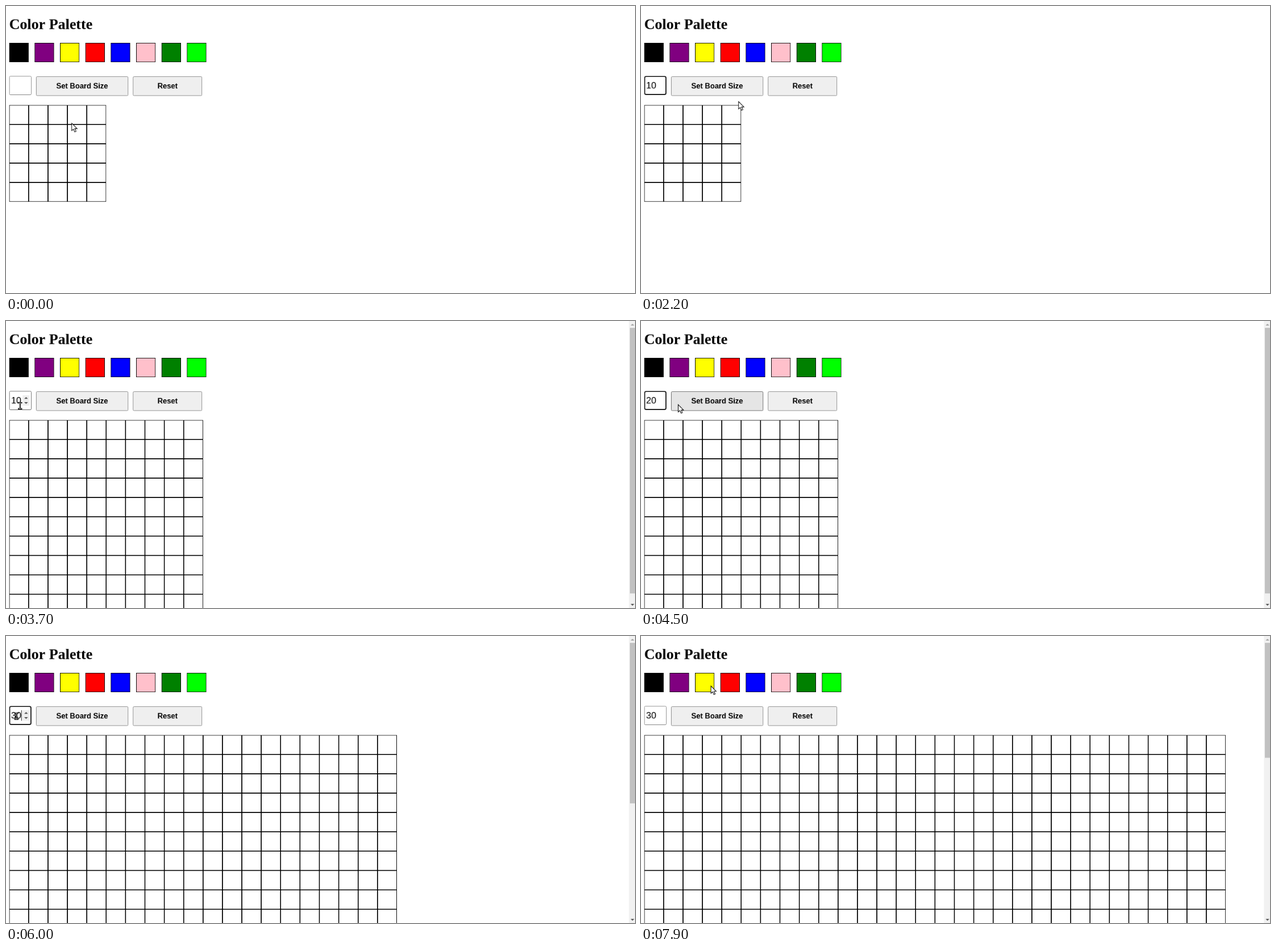
Animation, 1107 px wide and 506 px high, one loop 8 s. Source, as an HTML page with a canvas:

```html
<!DOCTYPE html>
<html lang="en">
<head>
<meta charset="utf-8">
<title>Color Palette</title>
<style>
  html, body { margin: 0; width: 1107px; height: 506px; overflow: hidden; background: #fff; }
  canvas { display: block; }
</style>
</head>
<body>
<canvas id="stage" width="1107" height="506"></canvas>
<script>
const stage = document.getElementById('stage').getContext('2d');
// The page is laid out on whole pixels, then shrunk onto the stage.
const W = 1363, H = 623;
const page = Object.assign(document.createElement('canvas'), { width: W, height: H });
const ctx = page.getContext('2d');

const LOOP = 8000, TICK = 100, LEFT = 7, CELL = 42, BASELINE = 179;
const COLORS = ['black', 'purple', 'yellow', 'red', 'blue', 'pink', 'green', 'lime'];

// Each round: click the field, type a size, press the button.
const ROUNDS = [
  { size: 10, focus: 800, type: 1500, press: 2900 },
  { size: 20, focus: 3800, type: 4100, press: 4700 },
  { size: 30, focus: 5600, type: 5900, press: 6400 }
];
// Pointer moves: start, end, target x, target y
const MOVES = [
  [100, 800, 25, 170], [2100, 2300, 273, 219], [2500, 2900, 153, 165],
  [3000, 3700, 30, 184], [4300, 4700, 97, 180], [4800, 5400, 22, 174],
  [6100, 6400, 114, 178], [7000, 7900, 151, 108]
];

function pointerAt(t) {
  let x = 142, y = 254;
  for (const [start, end, toX, toY] of MOVES) {
    const k = Math.min(1, Math.max(0, (t - start) / (end - start)));
    const eased = k * (2 - k);
    x += (toX - x) * eased;
    y += (toY - y) * eased;
  }
  return [Math.round(x), Math.round(y)];
}

function stateAt(t) {
  const state = { value: '', size: 5, focused: false, pressed: false, clearing: false };
  for (const { size, focus, type, press } of ROUNDS) {
    const typed = Math.floor((t - type) / TICK) + 1;
    if (typed >= 0) state.value = String(size).slice(0, typed);
    if (t >= press + TICK) state.size = size;
    state.focused ||= t >= focus && t < press;
    state.pressed ||= t >= press && t < press + TICK;
    state.clearing ||= typed === 0;
  }
  return state;
}

function rect(x, y, w, h, color) {
  ctx.fillStyle = color;
  ctx.fillRect(x, y, w, h);
}

function roundBox(x, y, w, h, fill, stroke, line = 1) {
  ctx.beginPath();
  ctx.roundRect(x + line / 2, y + line / 2, w - line, h - line, line + 1);
  ctx.fillStyle = fill;
  ctx.fill();
  ctx.lineWidth = line;
  ctx.strokeStyle = stroke;
  ctx.stroke();
}

function text(str, x, y, font, align = 'left') {
  ctx.font = font;
  ctx.textAlign = align;
  ctx.fillStyle = '#000';
  ctx.fillText(str, x, y);
}

function triangle(x, y, h, color) {
  ctx.beginPath();
  ctx.moveTo(x - 4, y);
  ctx.lineTo(x + 4, y);
  ctx.lineTo(x, y + h);
  ctx.fillStyle = color;
  ctx.fill();
}

function button(label, x, w, fill = '#efefef', border = '#767676') {
  roundBox(x, 153, w, 42, fill, border);
  text(label, x + w / 2, BASELINE, 'bold 16px "Liberation Sans", sans-serif', 'center');
}

function field({ value, focused, clearing }, hover) {
  if (focused) roundBox(LEFT, 152, 48, 41, '#fff', '#101010', 2);
  else roundBox(LEFT, 152, 48, 41, '#fff', hover ? '#4f4f4f' : '#767676');
  text(value, 11, BASELINE, '20px "Liberation Sans", sans-serif');
  if (!hover) return;
  if (focused && !clearing) rect(11 + Math.round(ctx.measureText(value).width), 161, 1, 23, '#000');
  rect(36, 161, 15, 23, '#efefef');
  triangle(43.5, 169, -4, '#505050');
  triangle(43.5, 176, 4, '#505050');
}

function board(size) {
  for (let i = 0; i <= size; i++) {
    const before = i ? 1 : 0, width = i && i < size ? 2 : 1;
    rect(LEFT + CELL * i - before, 215, width, CELL * size, '#000');
    rect(LEFT, 215 + CELL * i - before, CELL * size, width, '#000');
  }
}

function scrollbar(contentHeight) {
  if (contentHeight <= H) return;
  rect(1350, 0, 15, H, '#f1f1f1');
  rect(1352, 15, 11, (H - 30) * H / contentHeight, '#c1c1c1');
  triangle(1357.5, 10, -4, '#a3a3a3');
  triangle(1357.5, H - 9, 4, '#505050');
}

function arrow(x, y) {
  const outline = new Path2D('M.5 .5V16.5L4.2 13.2L6.9 19.3L9.7 18L7.1 12.2H12Z');
  ctx.save();
  ctx.translate(x, y);
  ctx.fillStyle = '#fff';
  ctx.fill(outline);
  ctx.lineWidth = 1.2;
  ctx.strokeStyle = '#000';
  ctx.stroke(outline);
  ctx.restore();
}

function iBeam(x, y) {
  for (const [grow, color] of [[1, '#000'], [0, '#bbb']]) {
    for (const end of [-7, 6]) rect(x - 3 - grow, y + end - grow, 7 + 2 * grow, 1 + 2 * grow, color);
    rect(x - grow, y - 7, 1 + 2 * grow, 14, color);
  }
}

function draw(t) {
  const [x, y] = pointerAt(t), state = stateAt(t);
  const overField = x >= LEFT && x < 55 && y >= 152 && y < 193;
  const overButton = x >= 65 && x < 265 && y >= 153 && y < 195;

  rect(0, 0, W, H, '#fff');
  text('Color Palette', LEFT, 50, 'bold 32px "Liberation Serif", serif');
  COLORS.forEach((color, i) => {
    rect(LEFT + 55 * i, 80, 42, 42, '#000');
    rect(LEFT + 55 * i + 1, 81, 40, 40, color);
  });
  field(state, overField);
  const look = state.pressed ? ['#f5f5f5', '#8d8d8d'] : overButton ? ['#e5e5e5', '#4f4f4f'] : [];
  button('Set Board Size', 65, 200, ...look);
  button('Reset', 275, 150);
  board(state.size);
  scrollbar(221 + CELL * state.size);
  (overField ? iBeam : arrow)(x, y);
  stage.drawImage(page, 0, 0, 1107, 506);
}

const start = performance.now();
function frame() {
  const t = (performance.now() - start) % LOOP;
  draw(Math.floor(t / TICK) * TICK);
  requestAnimationFrame(frame);
}
frame();
</script>
</body>
</html>
```
